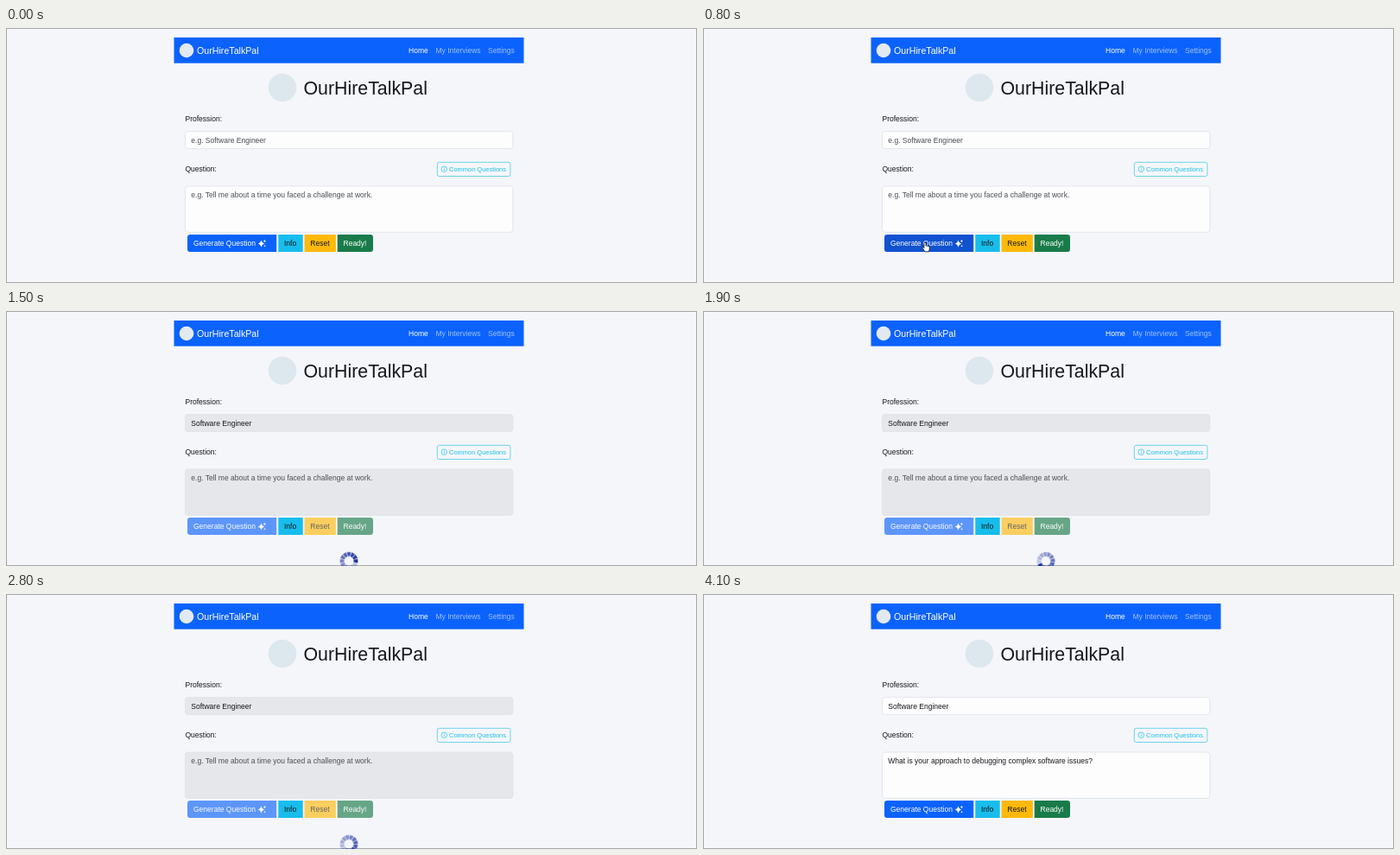
Animation, 800 px wide and 295 px high, one loop 4200 ms. Source, as an HTML page:

```html
<!DOCTYPE html>
<html lang="en">
<head>
<meta charset="utf-8">
<title>Interview practice</title>
<style>
html, body { margin: 0; width: 100%; height: 100%; overflow: hidden; background: #f5f6fa; }
svg { display: block; width: 100vw; height: 100vh; }
text { font: 8.53px "Liberation Sans", Arial, sans-serif; fill: #15171a; }
.brand { font-size: 10.66px; fill: #fff; }
.title { font-size: 21.33px; }
.small { font-size: 7.47px; fill: #1cc2ea; }
.hint { fill: #4a4e53; }
.white { fill: #fff; }
.dim { fill: #a0c1fe; }
.field { fill: #fdfdfe; stroke: #dde1e7; stroke-width: .8; }

.idle, .busy, .done, .field, .lock, .gen, .cursor, .filled, .ring {
  animation: 4.2s step-end infinite;
}
/* Press at 1 s, answer at 3.1 s */
.idle { animation-name: idle; }
.blank { animation-name: blank; }
.busy { animation-name: busy; }
.filled { animation-name: filled; }
.done { animation-name: done; }
.field { animation-name: field; }
.lock { animation-name: lock; }
.gen { fill: #0b62fd; animation-name: gen; }
.cursor { animation-name: cursor; animation-timing-function: ease-out; }
.ring { animation-name: spin; animation-timing-function: steps(42); animation-delay: -.005s; }

@keyframes idle { 0% { visibility: visible } 23.7%, 100% { visibility: hidden } }
@keyframes blank { 0% { visibility: visible } 73.7%, 100% { visibility: hidden } }
@keyframes busy { 0% { visibility: hidden } 23.7% { visibility: visible } 73.7%, 100% { visibility: hidden } }
@keyframes filled { 0% { visibility: hidden } 23.7%, 100% { visibility: visible } }
@keyframes done { 0% { visibility: hidden } 73.7%, 100% { visibility: visible } }
@keyframes field {
  0% { fill: #fdfdfe } 23.7% { fill: #e6e7eb } 73.7%, 100% { fill: #fdfdfe }
}
@keyframes lock { 0% { opacity: 1 } 23.7% { opacity: .65 } 73.7%, 100% { opacity: 1 } }
@keyframes gen { 0% { fill: #0b62fd } 11.9% { fill: #1152cf } 23.7%, 100% { fill: #0b62fd } }
@keyframes cursor {
  0%, 11.8% { visibility: hidden; transform: translate(-16px, -4px) }
  11.9% { visibility: visible; transform: translate(-16px, -4px) }
  18.5%, 23.6% { visibility: visible; transform: none }
  23.7%, 100% { visibility: hidden; transform: none }
}
@keyframes spin { to { transform: rotate(4.2turn) } }
</style>
</head>
<body>
<svg viewBox="0 0 800 295" preserveAspectRatio="none">
  <rect width="800" height="295" fill="#f5f6fa"/>
  <rect x=".5" y=".5" width="799" height="294" fill="none" stroke="#a5a6aa"/>

  <rect x="194.5" y="11" width="405" height="29.7" fill="#0b62fd"/>
  <circle cx="209" cy="26" r="8.3" fill="#e3e9f0"/>
  <text class="brand" x="221" y="29.5">OurHireTalkPal</text>
  <text class="white" x="466" y="29">Home</text>
  <text class="dim" x="497.5" y="29">My Interviews</text>
  <text class="dim" x="558" y="29">Settings</text>

  <circle cx="320" cy="69" r="16.3" fill="#dce8ed"/>
  <text class="title" x="344.5" y="76.5">OurHireTalkPal</text>

  <text x="207.5" y="107.5">Profession:</text>
  <rect class="field" x="207.5" y="119.6" width="379.3" height="20" rx="3.2"/>
  <text class="hint idle" x="214.3" y="132.5">e.g. Software Engineer</text>
  <text class="filled" x="214.3" y="132.5">Software Engineer</text>

  <text x="207.5" y="166.3">Question:</text>
  <rect x="499.3" y="155.3" width="84.6" height="16.2" rx="2.2" fill="none" stroke="#4bc9e8" stroke-width=".8"/>
  <g fill="none" stroke="#1cc2ea" stroke-width=".7">
    <circle cx="507.3" cy="163.2" r="3.3"/>
    <path d="M507.3 162.6v2.5M507.3 161v.8"/>
  </g>
  <text class="small" x="513" y="166">Common Questions</text>
  <rect class="field" x="207.5" y="183" width="379.3" height="53.3" rx="3.2"/>
  <text class="hint idle blank" x="214.3" y="196">e.g. Tell me about a time you faced a challenge at work.</text>
  <text class="done" x="214.3" y="196">What is your approach to debugging complex software issues?</text>

  <g class="lock">
    <path class="gen" d="M213.2 239H313.2V259H213.2a3.2 3.2 0 0 1-3.2-3.2V242.2a3.2 3.2 0 0 1 3.2-3.2z"/>
    <text class="white" x="217" y="252">Generate Question</text>
    <path class="white" d="M295.5 245.3q.6 3.3 3.8 4.2q-3.2.9-3.8 4.2q-.6-3.3-3.8-4.2q3.2-.9 3.8-4.2zM299.4 244.6l.5 1.3 1.3.5-1.3.5-.5 1.3-.5-1.3-1.3-.5 1.3-.5zM299.6 250.8l.4 1 1 .4-1 .4-.4 1-.4-1-1-.4 1-.4z"/>
  </g>
  <rect x="315.3" y="239" width="28.4" height="20" fill="#17bdec"/>
  <text x="322" y="252">Info</text>
  <g class="lock">
    <rect x="345.5" y="239" width="36.4" height="20" fill="#ffb90b"/>
    <text x="352.3" y="252">Reset</text>
  </g>
  <g class="lock">
    <path d="M383.7 239H421.8a3.2 3.2 0 0 1 3.2 3.2V255.8a3.2 3.2 0 0 1-3.2 3.2H383.7z" fill="#197b49"/>
    <text class="white" x="390.5" y="252">Ready!</text>
  </g>

  <g class="busy" transform="translate(397 289.3)"><g class="ring" id="ring"></g></g>

  <g class="cursor">
    <path d="M256 249.2c0-1.5 2-1.5 2 0v3c.5-.7 1.5-.5 1.6.2c.5-.5 1.3-.3 1.4.4c.6-.3 1.2 0 1.2.8v2.1c0 1.1-.7 1.7-.8 3.1h-4.6c-.3-1.4-1.9-2.8-2.7-4.2c-.5-1 .7-1.6 1.3-.8l.6.7z" fill="#fff" stroke="#111" stroke-width=".75" stroke-linejoin="round"/>
  </g>
</svg>
<script>
const ring = document.getElementById('ring');
const count = 12;
for (let i = 0; i < count; i++) {
  const bar = document.createElementNS(ring.namespaceURI, 'path');
  bar.setAttribute('d', 'M-1.2-5.4L-2.3-10.3H2.3L1.2-5.4z');
  bar.setAttribute('fill', '#142c9c');
  bar.setAttribute('opacity', 1 - 0.75 * i / (count - 1));
  bar.setAttribute('transform', `rotate(${-90 - i * 360 / count})`);
  ring.append(bar);
}
</script>
</body>
</html>
```
